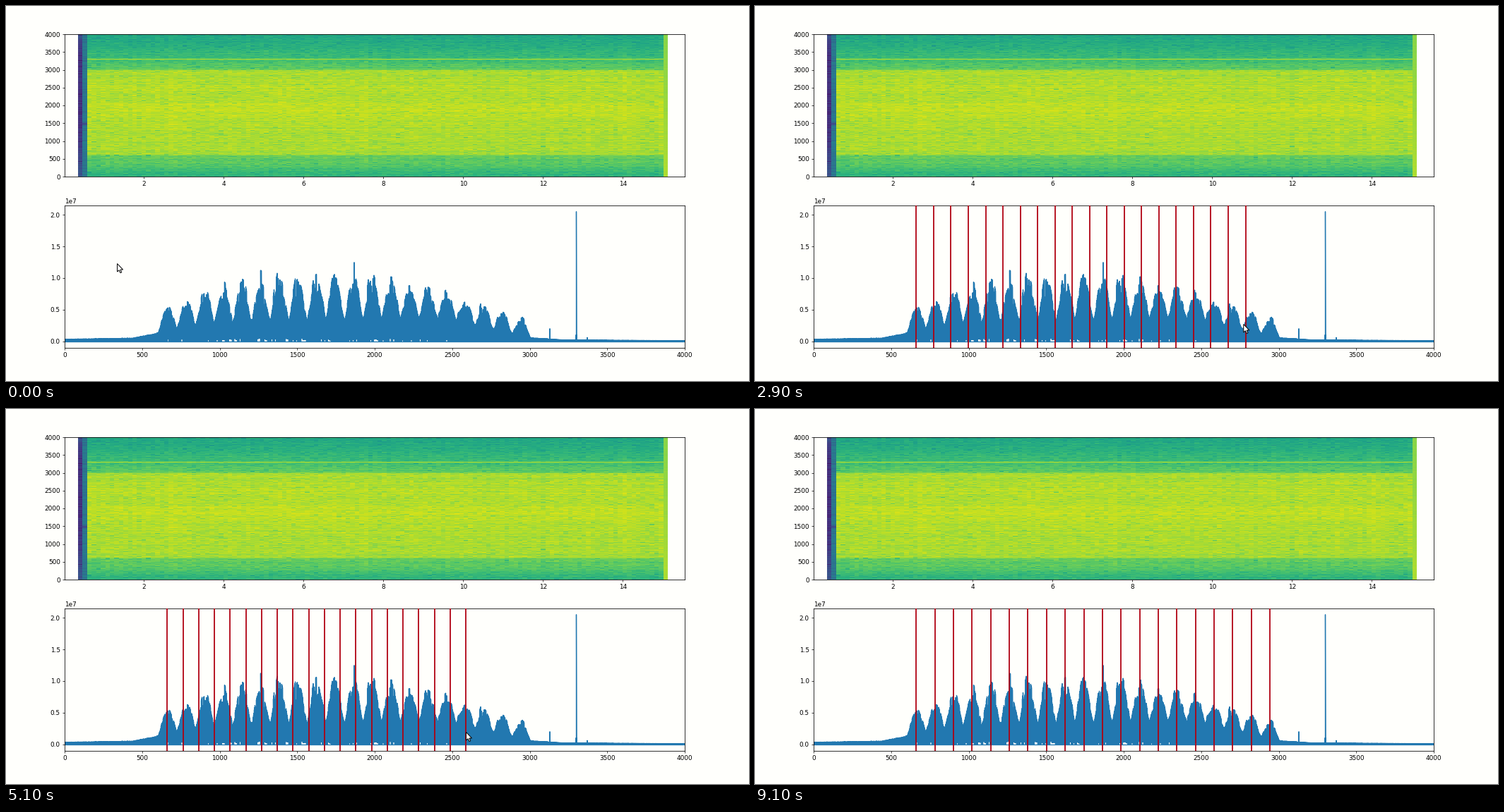
A matplotlib script that plays this animation: 1052x532 px, repeating every 9.3 s.

```python
import matplotlib.pyplot as plt
import numpy as np
from matplotlib.animation import FuncAnimation
from matplotlib.patches import Polygon

WIDTH, HEIGHT, DPI = 1052, 532, 64
STEP, LOOP = 100, 9300
LEFT, SPAN, TALL = 83, 878, 202          # axes box in pixels
HZ_PER_PX = 4000 / SPAN
UNIT_PER_PX = 2.2495e7 / TALL
PAPER, BLUE, RED = "#fffffc", "#2278b0", "#b00010"
LINES, FIRST, GAP = 20, 228.4, 26.37
COMB_START, COMB_END, LEAD = 1700, 6400, 100
rng = np.random.default_rng(7)

# Pointer path: time, x, y. The last comb line runs LEAD ms ahead of it.
PATH = np.array([
    (0, 157, 365), (700, 217, 409), (1700, 228, 413), (1900, 361, 434),
    (2100, 379, 438), (2300, 543.6, 443), (2500, 543.6, 443), (2800, 688, 450),
    (3000, 694.5, 452), (3400, 722, 459), (4300, 722, 459), (4400, 671, 462),
    (4700, 437, 480), (5100, 651, 458), (5200, 651, 458), (5800, 733, 463),
    (6100, 733, 463), (6300, 729, 463), (7800, 729, 463), (7900, 321, 330),
    (8200, 289, 199), (8400, 289, 199), (8900, 23, -30)])


def path_at(t):
    return np.array([np.interp(t, PATH[:, 0], PATH[:, i]) for i in (1, 2)])


def to_hz(x):
    return (np.asarray(x) - LEFT) * HZ_PER_PX


def curve(at, *points):
    return np.interp(at, *zip(*points))


def make_spectrogram(rows=202, cols=130):
    freq = (np.arange(rows) + 0.5) * 4000 / rows
    body = curve(freq, (0, .64), (300, .74), (600, .78), (615, .87), (2000, .91),
                 (2990, .87), (3010, .76), (3500, .66), (4000, .59))
    noise = 0.075 * np.log10(rng.gamma(2, 0.5, (rows, cols)))
    stripes = rng.normal(0, .012, (rows, 1))
    image = body[:, None] + noise + stripes + rng.normal(0, .005, cols)
    image[int(3300 / 4000 * rows)] = 0.88
    image[:, 0] = noise[:, 0] + curve(freq, (0, .27), (1400, .14), (3400, .15), (4000, .25))
    image[:, 1] = 0.4 + noise[:, 1] - 0.15 * np.exp(-((freq - 1480) / 40) ** 2)
    image[:, -1] = 0.88 - 0.06 * freq / 4000 + noise[:, -1] * 0.2
    return image.clip(0, 0.94)


def make_spectrum():
    """Top and bottom of the trace, in pixels above zero, every half pixel."""
    x = np.arange(LEFT, LEFT + SPAN + 0.1, 0.5)
    k = (x - FIRST - 0.4) / GAP          # position counted in humps
    floor = curve(x, (83, 3), (180, 4.5), (212, 11), (241, 18), (300, 27),
                  (620, 33), (742, 5), (790, 2), (961, 1))
    crest = 26 + 62 * np.sin(np.pi * (k + 2.5) / 22)
    hump = np.where((k > -0.5) & (k < LINES - 0.5), abs(np.cos(np.pi * k)) ** 1.3, 0)
    jitter = np.repeat(rng.normal(1, 0.075, x.size // 3 + 1), 3)[:x.size]
    top = (floor + (crest - floor) * hump) * (1 + (jitter - 1) * (0.4 + hump))

    tones = [(493, 112), (770, 18), (807, 9), (807.5, 184), (808, 9), (823, 5.5)]
    for at, height in tones:
        top[np.argmin(abs(x - at))] = height

    cells = x.size // 5 + 1
    holes = np.where(rng.random(cells) < 0.25, rng.uniform(2, 4.5, cells), 0)
    bottom = np.repeat(holes, 5)[:x.size]
    bottom[(x < FIRST) | (x > 635)] = 0
    return x, top, bottom


def add_axes(y):
    ax = fig.add_axes([LEFT / WIDTH, 1 - (y + TALL) / HEIGHT,
                       SPAN / WIDTH, TALL / HEIGHT], facecolor=PAPER)
    for spine in ax.spines.values():
        spine.set_linewidth(0.9)
    return ax


fig = plt.figure(figsize=(WIDTH / DPI, HEIGHT / DPI), dpi=DPI, facecolor=PAPER)

upper = add_axes(40)
upper.imshow(make_spectrogram(), origin="lower", aspect="auto", cmap="viridis",
             vmin=0, vmax=1, interpolation="nearest", extent=(0.35, 15.12, 0, 4000))
upper.set(xlim=(0.014, 15.554), ylim=(0, 4000), yticks=range(0, 4001, 500))

lower = add_axes(283)
px, top, bottom = make_spectrum()
trace = np.column_stack([bottom, top]).ravel() * UNIT_PER_PX
lower.plot(np.repeat(to_hz(px), 2), trace, color=BLUE)
lower.axhline(0, color=BLUE)
lower.set(xlim=(0, 4000), ylim=(-0.1025e7, 2.147e7),
          yticks=np.arange(0, 2.1e7, 0.5e7))
comb = [lower.axvline(0, color=RED, linewidth=2, visible=False, zorder=3)
        for _ in range(LINES)]

overlay = fig.add_axes([0, 0, 1, 1], xlim=(0, WIDTH), ylim=(HEIGHT, 0))
overlay.axis("off")
ARROW = np.array([(0.5, 0.5), (0.5, 12), (3.1, 9.7), (4.9, 13.6), (6.7, 12.8),
                  (5, 9), (8.6, 9)])
pointer = overlay.add_patch(Polygon(ARROW, facecolor="white", edgecolor="black",
                                    linewidth=1.1, joinstyle="miter"))


def draw(frame):
    now = frame * STEP
    pointer.set_xy(ARROW + path_at(now))
    last = path_at(min(now + LEAD, COMB_END))[0]
    for line, x in zip(comb, to_hz(np.linspace(FIRST, last, LINES))):
        line.set_xdata([x, x])
        line.set_visible(now >= COMB_START)
    return [pointer, *comb]


anim = FuncAnimation(fig, draw, frames=LOOP // STEP, interval=STEP,
                     repeat=True, repeat_delay=0, blit=False)
plt.show()
```
